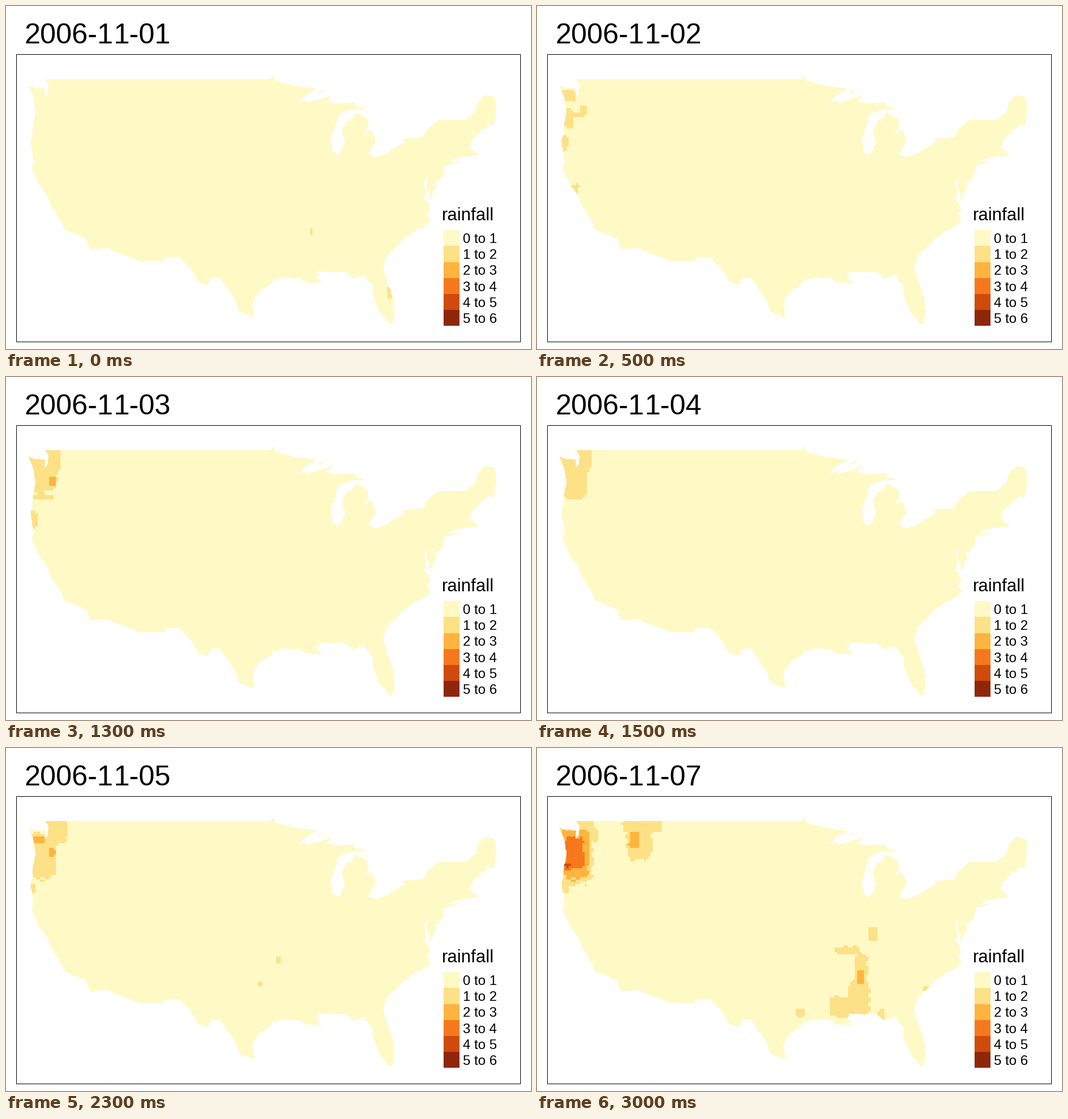
Recreate the animation shown at these times as a matplotlib script. Size 925 px wide and 605 px high, loop 3500 ms.

```python
import numpy as np
import matplotlib.pyplot as plt
from matplotlib.animation import FuncAnimation
from matplotlib.colors import ListedColormap
from matplotlib.patches import PathPatch, Rectangle
from matplotlib.path import Path

W, H, DPI = 925, 605, 100
DAYS = 7
CELL, COUNTY = 4, 2  # rain cell in pixels, county width in cells
LEFT, TOP, COLS, ROWS = 20, 88, 222, 126
COLORS = ["#FFF9C5", "#FDE187", "#FEB43F", "#F6781D", "#D04A0C", "#8F260A"]
rng = np.random.default_rng(4)

plt.rcParams["font.family"] = "Liberation Sans"
fig = plt.figure(figsize=(W / DPI, H / DPI), dpi=DPI, facecolor="white")
ax = fig.add_axes([0, 0, 1, 1])


def label(x, y, text, px):
    return ax.text(x, y, text, fontsize=px * 72 / DPI, color="black",
                   ha="left", va="baseline")


def ragged(points, amount):
    """Join key points by a line with a small random notch every 4 pixels."""
    points = np.array(points, float)
    out = [points[:1]]
    for a, b in zip(points, points[1:]):
        steps = max(1, int(np.hypot(*(b - a)) // 4))
        t = np.arange(1, steps + 1)[:, None] / steps
        line = a + (b - a) * t
        line[:-1] += rng.normal(0, amount, (steps - 1, 2))
        out.append(line)
    return np.vstack(out)


# Key points of each stretch, clockwise from the north-west corner
north = [(69, 129), (467, 129), (470, 122), (475, 132), (509, 141), (549, 146)]

superior = [(549, 146), (530, 156), (512, 171), (531, 166), (529, 171),
            (562, 162), (575, 156), (565, 169), (579, 172), (615, 170),
            (614, 175), (635, 182), (607, 183), (590, 189), (571, 209)]

michigan = [(571, 209), (585, 196), (572, 235), (576, 257), (583, 263),
            (593, 254), (597, 240), (592, 218), (606, 198), (605, 206),
            (617, 188), (637, 200), (639, 211), (630, 226), (644, 218),
            (651, 238), (638, 262)]

border = [(638, 262), (652, 267), (669, 261), (703, 240), (700, 234),
          (735, 232), (741, 219), (762, 201), (809, 201), (827, 187),
          (831, 171), (844, 157), (859, 160), (863, 166), (863, 189)]

new_england = [(863, 189), (859, 213), (852, 209), (841, 217), (821, 236),
               (817, 249), (829, 260), (828, 256), (832, 262), (816, 265),
               (789, 269), (773, 279), (771, 297), (760, 311), (751, 300),
               (758, 320), (746, 344)]

atlantic = [(746, 344), (747, 329), (741, 321), (743, 302), (737, 312),
            (741, 336), (734, 340), (744, 348), (748, 361), (741, 366),
            (748, 379), (734, 391), (719, 397), (698, 414), (673, 438),
            (666, 455), (666, 466), (672, 487), (683, 518), (685, 541),
            (681, 560)]

gulf = [(681, 560), (676, 562), (656, 536), (646, 511), (647, 495),
        (631, 474), (611, 481), (599, 469), (548, 469), (553, 474),
        (544, 477), (556, 488), (530, 488), (519, 481), (487, 478),
        (474, 486), (472, 480), (464, 493), (447, 502), (435, 522),
        (437, 549)]

mexico = [(437, 549), (411, 539), (404, 518), (377, 479), (363, 479),
          (355, 492), (339, 487), (325, 463), (305, 443), (279, 443),
          (279, 450), (237, 450), (184, 430), (184, 427), (148, 429)]

pacific = [(148, 429), (142, 411), (131, 406), (101, 393), (99, 382),
           (80, 353), (72, 333), (61, 319), (45, 287), (49, 272), (43, 241),
           (52, 186), (49, 165), (40, 140), (49, 144), (69, 146), (68, 160),
           (74, 153), (75, 139), (69, 129)]

outline = np.vstack([
    ragged(north, 0), ragged(superior, 0.5), ragged(michigan, 0.5),
    ragged(border, 0.15), ragged(new_england, 0.6), ragged(atlantic, 0.6),
    ragged(gulf, 0.6), ragged(mexico, 0.15), ragged(pacific, 0.45)])
lake_isle = [(550, 153), (568, 145), (553, 155), (550, 153)]
long_isle = [(772, 281), (776, 277), (804, 273), (783, 280), (772, 281)]

land_path = Path.make_compound_path(
    *[Path(p, closed=True) for p in (outline, lake_isle, long_isle)])
ax.add_patch(PathPatch(land_path, facecolor=COLORS[0], edgecolor="none"))

# Rain is sampled on a grid; each county bends the edge of a storm a little
right, bottom = LEFT + COLS * CELL, TOP + ROWS * CELL
X, Y = np.meshgrid(np.arange(LEFT, right, CELL) + CELL / 2,
                   np.arange(TOP, bottom, CELL) + CELL / 2)
county = np.kron(rng.uniform(0.8, 1.2, (ROWS // COUNTY, COLS // COUNTY)),
                 np.ones((COUNTY, COUNTY)))
rain = np.zeros((DAYS, ROWS, COLS))


def storm(day, x, y, rx, ry, gain=0):
    """Rain of 1 at the rim of a rounded box, rising by gain to its centre."""
    reach = county * np.hypot(((X - x) / rx) ** 2, ((Y - y) / ry) ** 2)
    fall = np.where(reach < 1, 1 + gain * (1 - reach), 0)
    rain[day - 1] = np.maximum(rain[day - 1], fall)


storm(1, 538, 397, 3, 5)
storm(1, 676, 505, 4, 10)

storm(2, 56, 158, 13, 10)
storm(2, 56, 198, 8, 18)
storm(2, 72, 191, 10, 4)
storm(2, 81, 184, 6, 8)
storm(2, 48, 242, 6, 15)
storm(2, 66, 323, 8, 9)

storm(3, 82, 149, 14, 23)
storm(3, 56, 170, 26, 34)
storm(3, 64, 211, 19, 5)
storm(3, 81, 184, 9, 11, 1.9)
storm(3, 49, 253, 6, 14)

storm(4, 82, 146, 14, 19)
storm(4, 60, 178, 28, 39)

storm(5, 87, 148, 20, 22)
storm(5, 62, 190, 26, 40)
storm(5, 57, 162, 16, 10, 1.9)
storm(5, 81, 184, 8, 10, 1.9)
storm(5, 48, 248, 5, 9)
storm(5, 480, 374, 4, 4)
storm(5, 447, 417, 5, 4)

storm(6, 68, 170, 42, 47, 4.8)
storm(6, 112, 138, 14, 9)
storm(6, 100, 178, 11, 12)
storm(6, 178, 143, 31, 19)
storm(6, 158, 138, 10, 18, 1.9)
storm(6, 174, 163, 15, 18, 1.9)
storm(6, 484, 383, 30, 17, 1.9)
storm(6, 515, 369, 9, 11)
storm(6, 476, 420, 29, 25)
storm(6, 437, 404, 10, 8)
storm(6, 434, 430, 9, 9)
storm(6, 461, 423, 9, 13, 1.9)

storm(7, 66, 185, 32, 56, 2.7)
storm(7, 54, 208, 10, 11, 3.6)
storm(7, 84, 135, 14, 8)
storm(7, 95, 154, 13, 13)
storm(7, 92, 198, 9, 7)
storm(7, 50, 248, 5, 9)
storm(7, 186, 138, 35, 11)
storm(7, 180, 170, 23, 28)
storm(7, 172, 163, 14, 21, 1.9)
storm(7, 592, 329, 9, 12)
storm(7, 547, 357, 22, 7)
storm(7, 571, 386, 11, 26)
storm(7, 570, 405, 10, 19, 1.9)
storm(7, 567, 440, 20, 30)
storm(7, 540, 457, 24, 18)
storm(7, 464, 466, 7, 8)
storm(7, 607, 471, 6, 10)
storm(7, 688, 424, 8, 5)

levels = np.ma.masked_less(np.floor(rain), 1)
picture = ax.imshow(levels[0], cmap=ListedColormap(COLORS), vmin=-0.5, vmax=5.5,
                    extent=(LEFT, right, bottom, TOP), aspect="auto",
                    interpolation="nearest", zorder=2)
picture.set_clip_path(land_path, ax.transData)

# Frame and legend
ax.add_patch(Rectangle((18.5, 85.5), 888, 507, fill=False, edgecolor="black",
                       linewidth=72 / DPI, snap=False, zorder=4))
label(767.5, 378.5, "rainfall", 31)
for i, color in enumerate(COLORS):
    ax.add_patch(Rectangle((771, 395.3 + 28.1 * i), 28, 28.2, facecolor=color,
                           edgecolor="none", zorder=3))
    label(805.4, 418.3 + 28.1 * i, f"{i} to {i + 1}", 24)

# The date is set in two parts so that the two ones are not kerned together
label(32.3, 66.4, "2006-1", 50.3)
date = label(188.9, 66.4, "", 50.3)

ax.set_xlim(0, W)
ax.set_ylim(H, 0)
ax.axis("off")


def update(frame):
    date.set_text(f"1-0{frame + 1}")
    picture.set_data(levels[frame])
    return [date, picture]


anim = FuncAnimation(fig, update, frames=DAYS, interval=500, repeat=True,
                     repeat_delay=0, blit=False)
plt.show()
```
